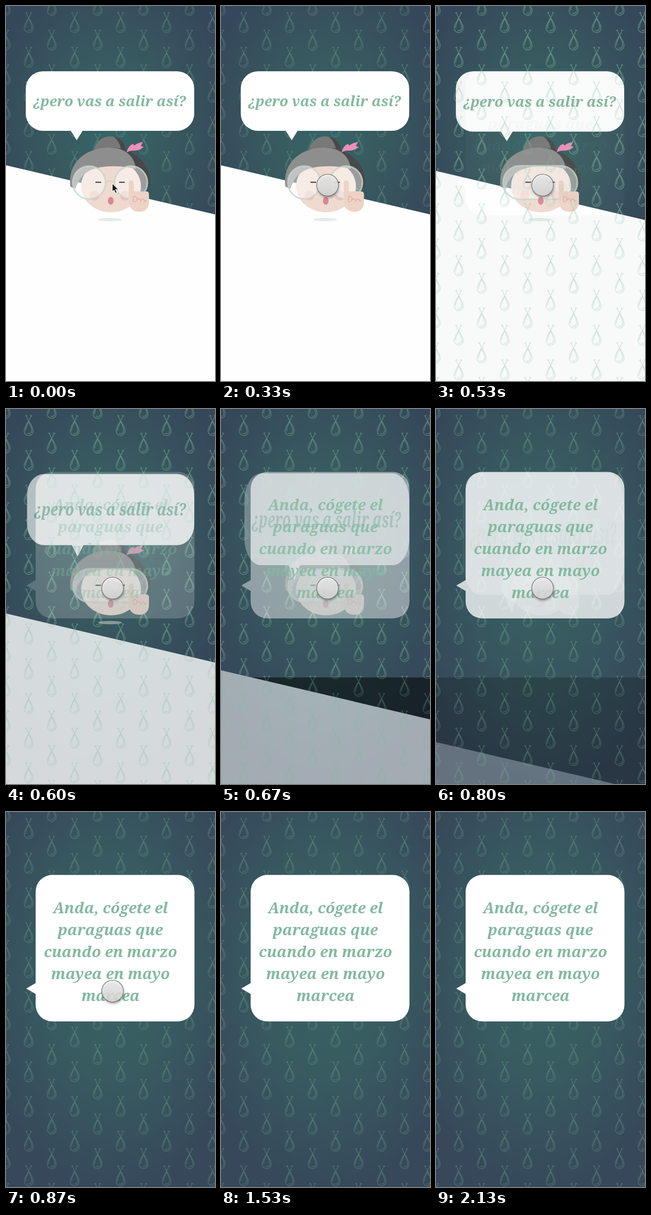
An HTML page for the animation above (2790 ms loop, 402 px wide and 718 px high).

```html
<!DOCTYPE html>
<html lang="es">
<head>
<meta charset="utf-8">
<title>¿Pero vas a salir así?</title>
<style>
html, body { margin: 0; width: 100%; height: 100%; overflow: hidden; background: #000; }
svg { display: block; width: 100vw; height: 100vh; }
text { font: italic 700 28.8px "Noto Serif", "Liberation Serif", serif; fill: #83b9a0; text-anchor: middle; }
#oldBubble text { font-size: 27.2px; }
</style>
</head>
<body>
<svg viewBox="0 0 402 718" preserveAspectRatio="none">
  <defs>
    <radialGradient id="glowShort" gradientUnits="userSpaceOnUse" cx="0" cy="0" r="1" gradientTransform="translate(201 235) scale(250 320)">
      <stop offset="0" stop-color="#376566"/><stop offset=".45" stop-color="#38595f"/><stop offset="1" stop-color="#35475a"/>
    </radialGradient>
    <radialGradient id="glowTall" gradientUnits="userSpaceOnUse" cx="0" cy="0" r="1" gradientTransform="translate(205 300) scale(270 430)">
      <stop offset="0" stop-color="#3a6463"/><stop offset=".5" stop-color="#385a60"/><stop offset="1" stop-color="#36485a"/>
    </radialGradient>
    <linearGradient id="knob" x2="0" y2="1">
      <stop offset="0" stop-color="#f4f4f4"/><stop offset="1" stop-color="#dcdcdc"/>
    </linearGradient>
    <filter id="blur" x="-50%" y="-50%" width="200%" height="200%"><feGaussianBlur stdDeviation="2"/></filter>
    <clipPath id="upper"><rect width="402" height="514"/></clipPath>
    <g id="drop" fill="none" stroke="#82b8a0" stroke-opacity=".26" stroke-width="1.7" stroke-linecap="round">
      <path d="M-4.5 -18C-2 -8 8.6 1 8.6 11.2A8.6 8.6 0 0 1 -8.6 11.2C-8.6 1 2 -8 4.5 -18"/>
      <path d="M0 -7C-2 -2 -6 4 -6 10.5M0 -7C2 -2 6 4 6 10.5A6 6 0 0 1 -2 16"/>
      <path d="M-6 -17.5L-3.6 -18.8M3.6 -18.8L6.2 -17.5"/>
    </g>
    <g id="drops"></g>
  </defs>

  <g id="oldPage">
    <rect width="402" height="718"/>
    <g clip-path="url(#upper)">
      <rect width="402" height="514" fill="url(#glowShort)"/>
      <use href="#drops"/>
    </g>
    <path id="slab" d="M0 305L402 399V1200H0Z" fill="#fefefe"/>
    <ellipse id="shadow" cx="200" cy="409" rx="23" ry="3.2" fill="#e4ebea"/>
    <g id="granny">
      <circle cx="200" cy="280" r="30.5" fill="#787878"/>
      <path d="M207 250.5C222 253 232 265 230.5 283L222 280C221 266 215 256 207 250.5Z" fill="#484848"/>
      <path d="M200 271C246 271 281 302 277 346L268 354L230 318Z" fill="#484848"/>
      <ellipse cx="202" cy="345" rx="57.5" ry="50" fill="#efdacf"/>
      <path d="M124 346C118 298 155 271 200 271C228 271 247 287 250 312Q224 306 200 307C168 308 143 317 134 350Z" fill="#8e8e8e"/>
      <path d="M232 280Q235 268 244 264L247 267Q254 261 263 261L259 268L265 270Q256 277 247 277Q240 276 232 280Z" fill="#f08dba"/>
      <g fill="#eac5bb"><circle cx="170" cy="363" r="9.5"/><circle cx="229" cy="363" r="9.5"/></g>
      <g fill="#fff" fill-opacity=".46" stroke="#c3d8ce" stroke-opacity=".8" stroke-width="3">
        <g id="lenses">
          <circle cx="160" cy="338" r="31.5"/><circle cx="240.5" cy="338" r="31.5"/>
          <path d="M191.5 339Q200.5 331 209.5 339" fill="none"/>
        </g>
        <rect id="visor" x="129" y="306" width="143" height="64" rx="32"/>
      </g>
      <path d="M172 337.5H183M217.5 337.5H228.5" stroke="#30324f" stroke-width="2.2"/>
      <ellipse cx="201.5" cy="373" rx="5.5" ry="7.5" fill="#d98796"/>
      <path d="M236 339a5 5 0 0 1 10 0V355H270Q275 355 275 361V374Q275 394 256 394Q237 393 236 374Z" fill="#edd3c6"/>
      <path d="M245 365Q252 363 252 370Q251 376 245 374ZM252 372Q255 366 259 371V375Q262 366 266 371V375M266 372L270 374" fill="none" stroke="#e3aeaa" stroke-width="1.4"/>
    </g>
    <g id="oldBubble">
      <rect x="38" y="125" width="324" height="114" rx="33" fill="#fff"/>
      <path d="M124 238H148L136 257Z" fill="#fff"/>
      <text x="199" y="192">¿pero vas a salir así?</text>
    </g>
  </g>

  <use id="veil" href="#drops"/>

  <g id="newPage">
    <rect width="402" height="718" fill="url(#glowTall)"/>
    <use href="#drops"/>
    <rect x="57" y="120.5" width="305.5" height="280.5" rx="32" fill="#fff"/>
    <path d="M58 327L39 338L58 349Z" fill="#fff"/>
  </g>
  <g id="saying"></g>

  <g id="touch">
    <circle cx="206" cy="346" r="21" opacity=".35" filter="url(#blur)"/>
    <circle cx="205" cy="343" r="20.8" fill="url(#knob)" fill-opacity=".85" stroke="#777" stroke-width="1.2"/>
  </g>
  <path id="arrow" d="M204.5 340V355.5L208 352.3L210.7 358.4L213.3 357.2L210.6 351.2H215.8Z" fill="#111" stroke="#fff" stroke-width="1"/>
</svg>
<script>
const LOOP = 2790, STEP = 200 / 3, START = 8;
const PROGRESS = [0.025, 0.2, 0.452, 0.63, 0.77, 1];
const $ = id => document.getElementById(id);
const lerp = (a, b, p) => a + (b - a) * p;
const show = (id, on) => $(id).setAttribute('visibility', on ? 'visible' : 'hidden');
const fade = (id, value) => $(id).setAttribute('opacity', Math.max(0, Math.min(1, value)));

function add(parent, tag, attrs, text = '') {
  const node = document.createElementNS('http://www.w3.org/2000/svg', tag);
  for (const key in attrs) node.setAttribute(key, attrs[key]);
  node.textContent = text;
  parent.append(node);
}

for (let col = 0; col < 10; col++) {
  for (let row = 0; row < 12; row++) {
    const y = (col % 2 ? 31 : -2) + row * 66.5;
    add($('drops'), 'use', { href: '#drop', x: -0.5 + col * 44.2, y });
  }
}

['Anda, cógete el', 'paraguas que', 'cuando en marzo', 'mayea en mayo', 'marcea']
  .forEach((line, i) => add($('saying'), 'text', { x: 201, y: 194 + i * 42 }, line));

// The first bubble stretches towards the second one's box.
function morphBubble(q) {
  const x = lerp(38, 57, q), y = lerp(125, 120.5, q);
  const sx = lerp(324, 305.5, q) / 324, sy = lerp(114, 280.5, q) / 114;
  $('oldBubble').setAttribute('transform',
    `translate(${x} ${y}) scale(${sx} ${sy}) translate(-38 -125)`);
}

function draw(t) {
  const step = Math.floor((t + 4) / STEP);
  const moving = step >= START;
  const p = moving ? PROGRESS[Math.min(step - START, PROGRESS.length - 1)] : 0;
  $('slab').setAttribute('transform', `translate(0 ${432 * p})`);
  morphBubble(p ** 1.25);
  fade('granny', 1 - p);
  fade('oldBubble', 1 - p);
  fade('shadow', 1 - 2.2 * p);
  fade('newPage', p);
  fade('saying', 1.8 * p);
  show('veil', moving);
  show('lenses', !moving);
  show('visor', moving);
  show('arrow', step < 4);
  show('touch', step >= 4 && step < 23);
}

let begin;
function tick(now) {
  begin ??= now;
  draw((now - begin) % LOOP);
  requestAnimationFrame(tick);
}
draw(0);
requestAnimationFrame(tick);
</script>
</body>
</html>
```
